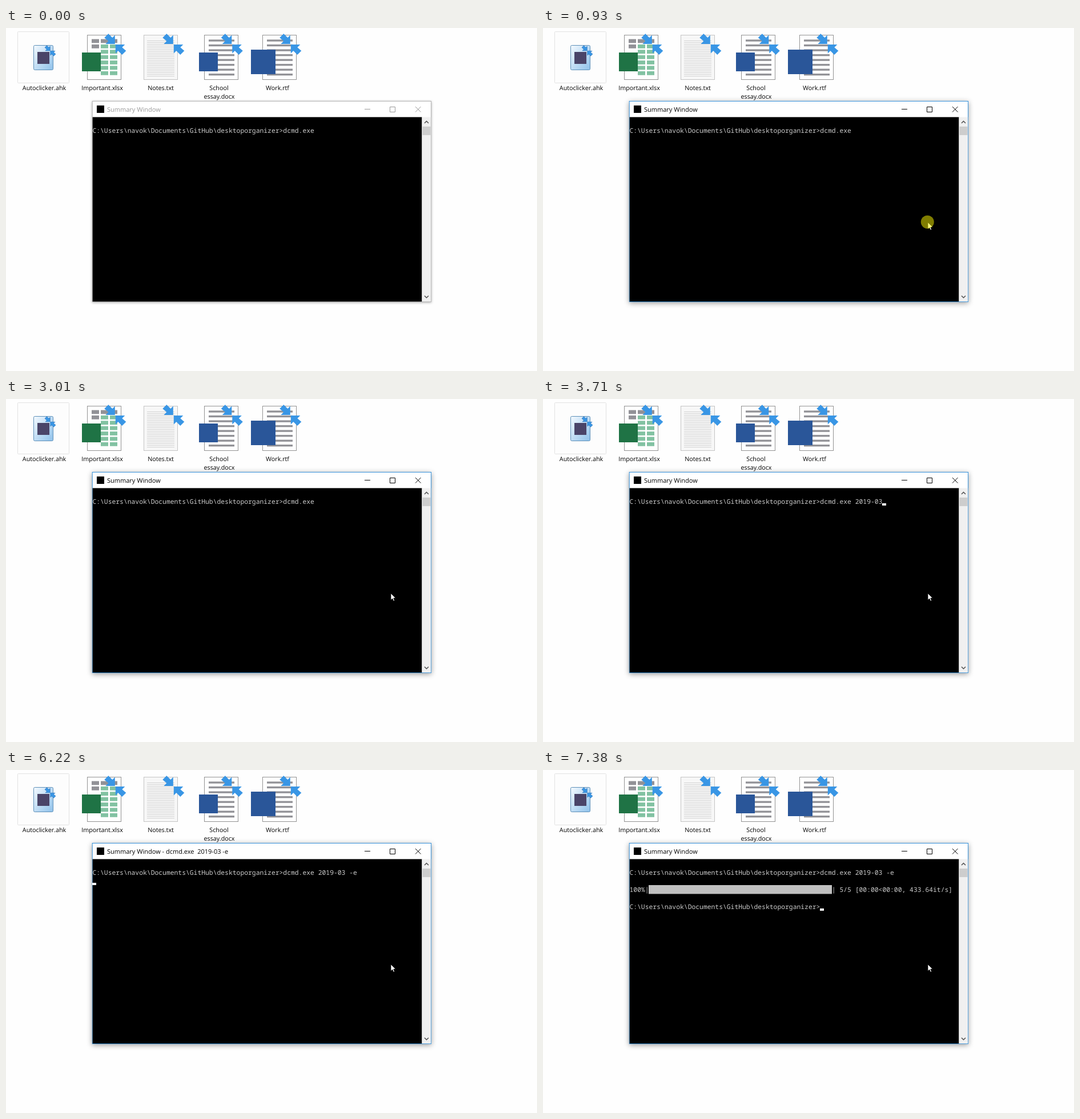
Write an HTML page that moves like this. It is 930 by 602 pixels and loops after 8 s.

```html
<!DOCTYPE html>
<html lang="en">
<head>
<meta charset="utf-8">
<title>Desktop organizer</title>
<style>
  html, body { margin: 0; width: 100%; height: 100%; overflow: hidden; background: #fefefe; }
  svg { display: block; }
  text { white-space: pre; text-rendering: geometricPrecision; }
  .ui { font: 10.75px "Open Sans", sans-serif; }
  #labels { text-anchor: middle; }
  #console { font: 11.367px "Noto Sans Mono", monospace; fill: #ccc; }
  #frame { stroke: #aaa; stroke-width: .85; filter: drop-shadow(0 1px 2px #0005); }
  #buttons { stroke: #999; fill: none; }
  #title { font-size: 11px; fill: #999; }
  .active #frame { stroke: #1883d7; filter: drop-shadow(0 2px 5px #0006); }
  .active #buttons { stroke: #000; }
  .active #title { fill: #000; }
</style>
</head>
<body>
<svg width="930" height="602" viewBox="0 0 930 602">
  <defs>
    <linearGradient id="sheet" x2="1" y2="1">
      <stop stop-color="#f4faff"/><stop offset="1" stop-color="#8fc1ea"/>
    </linearGradient>
    <path id="arrow" d="M-12-18.5l7 7 4.5-4.5V-.5H-17l5-5-7-6z"/>
    <g id="arrows" fill="#3996e5">
      <use href="#arrow"/><use href="#arrow" transform="rotate(180)"/>
    </g>
  </defs>

  <rect x="20.5" y="6.5" width="90" height="90" rx="1" fill="#fdfdfd" stroke="#e2e2e2"/>
  <rect x="48.5" y="30.5" width="34" height="43" rx="2" fill="url(#sheet)" stroke="#5d8fb8"/>
  <rect x="55" y="42" width="21" height="21" fill="#4a4468"/>
  <use href="#arrows" transform="translate(77.5 40) scale(.5)" stroke="#1d5fa5"/>
  <g id="files"></g>
  <g id="labels" class="ui"></g>

  <g id="window">
    <rect id="frame" x="151.2" y="128.5" width="593.4" height="352" fill="#fff"/>
    <rect x="159" y="136" width="13" height="13"/>
    <text id="title" class="ui" x="177" y="147"></text>
    <path id="buttons" d="M628 142.5h10M672.5 138.5h9v9h-9zM717 138l9.5 9.5m0-9.5l-9.5 9.5"/>
    <rect x="151.6" y="156.4" width="577" height="323.7"/>
    <rect x="728.4" y="156.4" width="15.8" height="323.7" fill="#f0f0f0"/>
    <rect x="729.5" y="173" width="14" height="15" fill="#cdcdcd"/>
    <path d="M733 167l3.5-3.5 3.5 3.5M733 470l3.5 3.5 3.5-3.5" fill="none" stroke="#505050" stroke-width="1.5"/>
    <g id="console">
      <text id="command" x="151.4" y="184"></text>
      <g id="progress">
        <text id="stats" x="151.4" y="214"></text>
        <rect x="185" y="202" width="321" height="15.5" fill="#c0c0c0"/>
      </g>
      <text id="prompt" x="151.4" y="244"></text>
      <rect id="caret" width="7" height="4" fill="#fff"/>
    </g>
  </g>
  <path id="mouse" d="M0 0v12l2.8-2.6 1.8 4.2 2-.9-1.8-4.1h3.7z" fill="#fff" stroke="#000" stroke-width=".8"/>
  <circle id="click" cx="673.3" cy="340.5" r="11.5" fill="#fffa00" opacity=".5"/>
</svg>
<script>
const $ = id => document.getElementById(id);
const rect = (x, y, w, h, fill, extra = '') =>
  `<rect x="${x}" y="${y}" width="${w}" height="${h}" fill="${fill}" ${extra}/>`;
const rows = (count, draw) => Array.from({ length: count }, (_, i) => draw(i)).join('');
const page = (x, fill = '#fff', stroke = '#929292') =>
  rect(x + .5, 12.5, 59, 78, fill, `stroke="${stroke}"`);
const arrows = x => `<use href="#arrows" x="${x}" y="28.5"/>`;
const textPage = x => page(x) + rows(8, i => rect(x + 8, 20.3 + 8.53 * i, 45, 3.4, '#929297'));

const cells = rows(7, r => rows(3, c => {
  const header = r === 0 || (r === 1 && c === 0);
  return r > 1 && c === 0 ? '' :
    rect(150 + 16 * c, 19.5 + 9.4 * r, 13, 6.8, header ? '#929297' : '#82c2a2');
}));

$('files').innerHTML =
  page(142) + cells + rect(133, 43, 33, 33, '#1f7345') + arrows(191.3) +
  page(241, '#f7f7f7', '#c4c4c4') + rows(21, i => rect(247, 22 + 3.1 * i, 48, 1, '#d2d2d2')) + arrows(293.3) +
  textPage(347) + rect(338, 43, 33, 33, '#2a5699') + arrows(395.8) +
  textPage(449) + rect(429, 38, 43, 43, '#2a5699') + arrows(498.3);

$('labels').innerHTML = [
  [67, 109, 'Autoclicker.ahk'], [168.5, 109, 'Important.xlsx'], [271, 109, 'Notes.txt'],
  [373, 109, 'School'], [373.5, 124, 'essay.docx'], [475.5, 109, 'Work.rtf']
].map(([x, y, s]) => `<text x="${x}" y="${y}">${s}</text>`).join('');

const LOOP = 8000, CELL = 6.82;
const PROMPT = 'C:\\Users\\navok\\Documents\\GitHub\\desktoporganizer>';
const COMMAND = 'dcmd.exe 2019-03 -e';
const TITLE = 'Summary Window';
const RUN = 5350, BAR = 7300, DONE = 7380;

// time, characters typed, caret visible
const STEPS = [
  [0, 8, 0], [1470, 8, 1], [1690, 9, 1], [2000, 9, 0], [2490, 9, 1], [3010, 9, 0],
  [3480, 9, 1], [3560, 11, 1], [3640, 14, 1], [3710, 16, 1], [4490, 16, 0],
  [4570, 17, 1], [4720, 18, 1], [4970, 19, 1], [5120, 19, 0],
  [RUN, 19, 1], [5670, 19, 0], [6220, 19, 1], [6750, 19, 0], [7220, 19, 1],
  [BAR, 19, 0], [DONE, 19, 1]
];

$('stats').textContent = '100%|' + ' '.repeat(47) + '| 5/5 [00:00<00:00, 433.64it/s]';
$('prompt').textContent = PROMPT;

const show = (id, visible) => $(id).setAttribute('visibility', visible ? 'visible' : 'hidden');

function moveMouse(t) {
  const p = Math.min(5, Math.floor((t - 220) / 78)) / 5;
  const left = (1 - p) ** 2;
  show('mouse', t >= 220);
  $('mouse').setAttribute('transform', `translate(${674 + 102 * left} ${341 + 194 * left})`);
}

function render(t) {
  const [, typed, caretOn] = STEPS.findLast(step => step[0] <= t);
  const running = t >= RUN && t < DONE;
  const column = t < RUN ? PROMPT.length + typed : running ? 0 : PROMPT.length;

  $('window').classList.toggle('active', t >= 930);
  $('title').textContent = TITLE + (running ? ' - dcmd.exe  2019-03 -e' : '');
  $('command').textContent = PROMPT + COMMAND.slice(0, typed);
  $('caret').setAttribute('x', Math.round(151 + column * CELL));
  $('caret').setAttribute('y', t < RUN ? 183 : running ? 198 : 243);
  show('caret', caretOn);
  show('progress', t >= BAR);
  show('prompt', t >= DONE);
  show('click', t >= 930 && t < 990);
  moveMouse(t);
}

function tick() {
  render(performance.now() % LOOP);
  requestAnimationFrame(tick);
}
tick();
</script>
</body>
</html>
```
